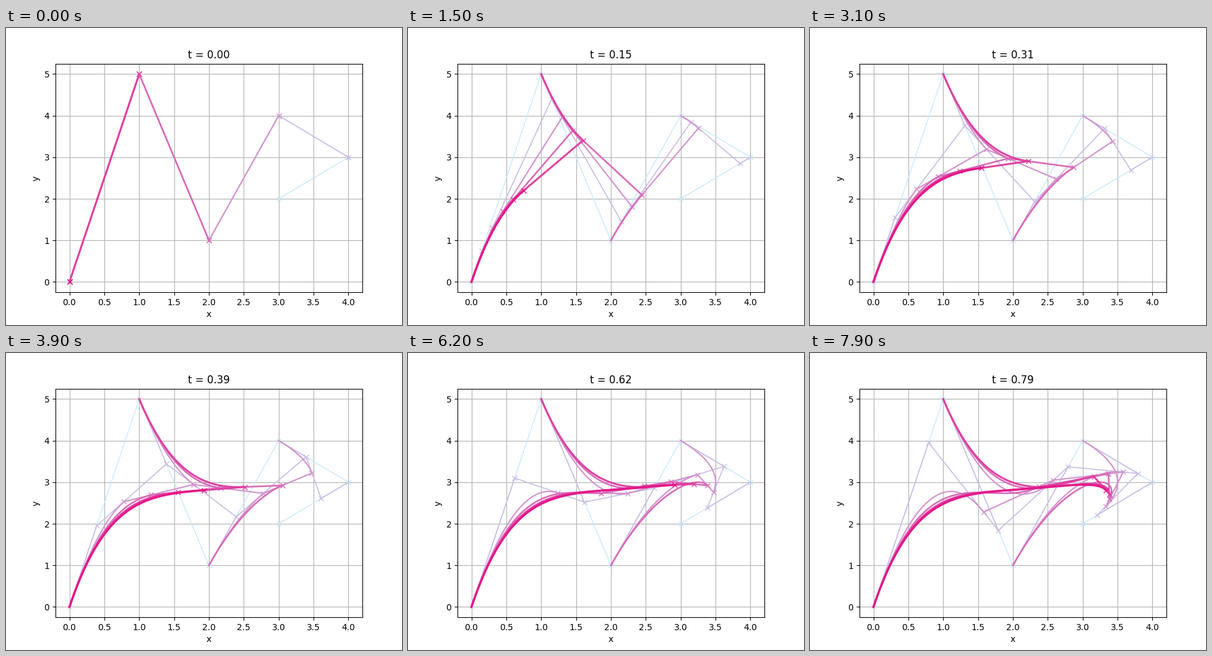
A matplotlib script for the animation above (8000 ms loop, 640x480 px).

```python
import numpy as np
import matplotlib.pyplot as plt
from matplotlib.animation import FuncAnimation

POINTS = np.array([(0, 0), (1, 5), (2, 1), (3, 4), (4, 3), (3, 2)], float)
DEGREE = len(POINTS) - 1
FRAMES = 80
STEP = 0.01
LIGHT = np.array([197, 233, 253]) / 255
PINK = np.array([229, 23, 138]) / 255


def casteljau(t):
    """Return the points of every level of the De Casteljau scheme at t."""
    levels = [POINTS]
    while len(levels[-1]) > 1:
        p = levels[-1]
        levels.append((1 - t) * p[:-1] + t * p[1:])
    return levels


history = [casteljau(i * STEP) for i in range(FRAMES)]
# paths[r][i] is the track of point i on level r over time
paths = [np.stack([h[r] for h in history], axis=1) for r in range(DEGREE + 1)]

fig, ax = plt.subplots(figsize=(6.4, 4.8), dpi=100)
ax.set_xlim(-0.2, 4.2)
ax.set_ylim(-0.25, 5.25)
ax.set_xlabel("x")
ax.set_ylabel("y")
ax.grid(True)
title = ax.set_title("t = 0.00")

polygons, traces = [], []
for r in range(DEGREE + 1):
    mix = r / DEGREE
    style = dict(color=LIGHT + mix * (PINK - LIGHT), linewidth=1 + 1.5 * mix)
    polygons.append(ax.plot([], [], marker="x", **style)[0])
    count = DEGREE + 1 - r if r else 0
    traces.append([ax.plot([], [], **style)[0] for _ in range(count)])


def update(frame):
    title.set_text(f"t = {frame * STEP:.2f}")
    for r, polygon in enumerate(polygons):
        polygon.set_data(*history[frame][r].T)
        for line, path in zip(traces[r], paths[r]):
            line.set_data(*path[:frame + 1].T)
    return [title, *polygons, *sum(traces, [])]


anim = FuncAnimation(fig, update, frames=FRAMES, interval=100,
                     repeat=True, repeat_delay=0, blit=False)
plt.show()
```
